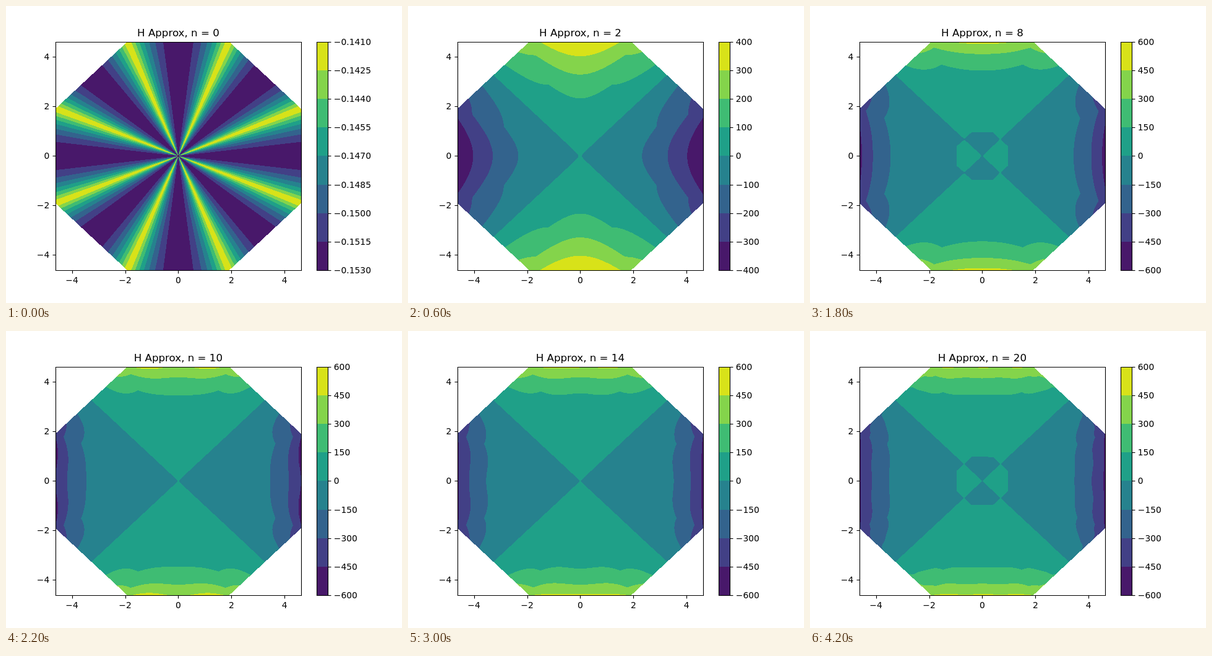
An HTML page with a canvas that plays this animation: 640 px wide and 480 px high, repeating every 4.4 s.

```html
<!DOCTYPE html>
<html lang="en">
<head>
<meta charset="utf-8">
<title>H Approx</title>
<style>
  html, body { margin: 0; width: 100%; height: 100%; overflow: hidden; background: #fff; }
  canvas, svg { position: absolute; left: 0; top: 0; width: 640px; height: 480px; }
  text { font: 13.89px "DejaVu Sans", sans-serif; fill: #000; white-space: pre; }
  #title { font-size: 16.67px; text-anchor: middle; }
  path { fill: none; stroke: #000; stroke-width: 1.11; }
</style>
</head>
<body>
<canvas id="field" width="640" height="480"></canvas>
<svg id="axes" viewBox="0 0 640 480">
  <text id="title" x="278.4" y="49"></text>
</svg>
<script>
const COLORS = ['#48186a', '#424086', '#33638d', '#26828e', '#1fa088', '#3fbc73', '#84d44b', '#d8e219'];
const BOX = { left: 80, right: 476.8, top: 57.6, bottom: 427.2 };
const BAR = { left: 501.6, right: 520.08 };
const BAND = (BOX.bottom - BOX.top) / COLORS.length;
const MAX_ORDER = 20;
const SAMPLES = 1000;
const CELLS = SAMPLES - 1;
const LOOP = 4400;

const APOTHEM = 5 * Math.cos(Math.PI / 8);
const CX = (BOX.left + BOX.right) / 2, CY = (BOX.top + BOX.bottom) / 2;
const SX = (BOX.right - CX) / APOTHEM, SY = (BOX.bottom - CY) / APOTHEM;

// 1 on the octagon's edge, 0 at its centre
function gauge(x, y) {
  x = Math.abs(x);
  y = Math.abs(y);
  return Math.max(x, y, (x + y) * Math.SQRT1_2) / APOTHEM;
}

// Levels are whole multiples of step, beginning at first * step
function scaleFor(order) {
  if (order === 0) return { first: -102, step: 0.0015, digits: 4 };
  if (order === 1) return { first: -5, step: 0.15, digits: 2 };
  return { first: -4, step: order < 4 ? 100 : 150, digits: 0 };
}

// ---- Zernike expansion of y^4 - x^4 on the octagon ----
const factorial = [1];
for (let i = 1; i <= MAX_ORDER; i++) factorial[i] = factorial[i - 1] * i;

function radial(n, m) {
  const out = new Float64Array(SAMPLES);
  const half = (n - m) / 2, terms = [];
  for (let k = 0; k <= half; k++) {
    terms.push((k % 2 ? -1 : 1) * factorial[n - k] /
      (factorial[k] * factorial[(n + m) / 2 - k] * factorial[half - k]));
  }
  for (let i = 0; i < SAMPLES; i++) {
    const t = i / CELLS;
    let sum = 0;
    for (const c of terms) sum = sum * t * t + c;
    out[i] = sum * t ** m;
  }
  return out;
}

// Plain sums over both end points, as the approximation uses
function angularMoment(m) {
  const step = 2 * Math.PI / CELLS;
  let sum = 0;
  for (let i = 0; i < SAMPLES; i++) {
    const a = i * step;
    const reach = 1 / gauge(Math.cos(a), Math.sin(a));
    sum -= reach ** 5 * Math.cos(2 * a) * Math.cos(m * a);
  }
  return sum * step;
}

const moments = Array.from({ length: MAX_ORDER + 1 }, (_, m) => angularMoment(m));
const modes = [];
for (let n = 0; n <= MAX_ORDER; n++) {
  for (let m = n % 2; m <= n; m += 2) {
    const shape = radial(n, m);
    let overlap = 0;
    shape.forEach((z, i) => { overlap += (i / CELLS) ** 5 * z / CELLS; });
    const weight = (m ? 2 : 1) * (n + 1) / Math.PI * moments[m] * overlap;
    modes.push({ n, m, shape, weight });
  }
}

// Radial profile of every angular harmonic, interleaved by radius
function profiles(order) {
  const width = order + 1;
  const table = new Float64Array(width * SAMPLES);
  for (const { n, m, shape, weight } of modes) {
    if (n > order) break;
    for (let i = 0; i < SAMPLES; i++) table[i * width + m] += weight * shape[i];
  }
  return table;
}

// ---- Filled contours ----
const ctx = document.getElementById('field').getContext('2d');
const rgba = COLORS.map(c => {
  const v = parseInt(c.slice(1), 16);
  return (0xff000000 | (v & 255) << 16 | (v & 0xff00) | v >> 16) >>> 0;
});
const cache = [];

function contours(order) {
  const x0 = 80, y0 = 58, w = 398, h = 370;
  const image = new ImageData(w, h);
  const pixels = new Uint32Array(image.data.buffer);
  const table = profiles(order), width = order + 1;
  const { first, step } = scaleFor(order);
  for (let j = 0; j < h; j++) {
    const y = (CY - y0 - j - 0.5) / SY;
    for (let i = 0; i < w; i++) {
      const x = (x0 + i + 0.5 - CX) / SX;
      const t = gauge(x, y);
      if (t > 1) continue;
      const r = Math.hypot(x, y), c = x / r;
      const cell = Math.min(CELLS - 1, Math.floor(t * CELLS));
      const f = t * CELLS - cell, base = cell * width;
      let b1 = 0, b2 = 0, p = 0;
      for (let m = order; m >= 0; m--) {
        const a = table[base + m];
        p = a + f * (table[base + width + m] - a);
        if (m) [b1, b2] = [p + 2 * c * b1 - b2, b1];
      }
      const value = (p + c * b1 - b2) * t / r;
      const band = Math.floor(value / step) - first;
      pixels[j * w + i] = rgba[Math.max(0, Math.min(COLORS.length - 1, band))];
    }
  }
  return { image, x0, y0 };
}

// ---- Axes ----
const svg = document.getElementById('axes');
const title = document.getElementById('title');
const snap = v => Math.round(v) + 0.5;

function add(tag, attrs, content = '') {
  const el = document.createElementNS('http://www.w3.org/2000/svg', tag);
  for (const key in attrs) el.setAttribute(key, attrs[key]);
  el.textContent = content;
  return svg.appendChild(el);
}

function frame(left, right) {
  const l = snap(left), r = snap(right), t = snap(BOX.top), b = snap(BOX.bottom);
  add('path', { d: `M${l} ${t}H${r}V${b}H${l}Z` });
}

const signed = s => s.replace('-', '\u2212');

COLORS.forEach((fill, i) => {
  const top = Math.round(BOX.bottom - (i + 1) * BAND);
  const bottom = Math.round(BOX.bottom - i * BAND);
  add('rect', { x: 502, y: top, width: 18, height: bottom - top, fill });
});
frame(BOX.left, BOX.right);
frame(BAR.left, BAR.right);

for (let v = -4; v <= 4; v += 2) {
  const x = CX + v * SX, y = CY - v * SY, label = signed(String(v));
  add('path', { d: `M${snap(x)} 427.5v5M80.5 ${snap(y)}h-5` });
  add('text', { x, y: 448, 'text-anchor': 'middle' }, label);
  add('text', { x: 70.3, y: Math.round(y + 5), 'text-anchor': 'end' }, label);
}

const barLabels = [];
for (let i = 0; i <= COLORS.length; i++) {
  const y = BOX.bottom - i * BAND;
  add('path', { d: `M520.5 ${snap(y)}h5` });
  barLabels.push(add('text', { x: 529.8, y: Math.round(y + 5) }));
}

// ---- Playback ----
let shown = -1;

function show(order) {
  if (order === shown) return;
  shown = order;
  const { image, x0, y0 } = cache[order] ||= contours(order);
  ctx.putImageData(image, x0, y0);
  title.textContent = `H Approx, n = ${order}`;
  const { first, step, digits } = scaleFor(order);
  barLabels.forEach((el, i) => {
    el.textContent = signed(((first + i) * step).toFixed(digits));
  });
}

const start = performance.now();

function tick() {
  const time = (performance.now() - start) % LOOP;
  show(Math.max(0, Math.floor(time / 200) - 1));
  requestAnimationFrame(tick);
}
tick();
</script>
</body>
</html>
```
